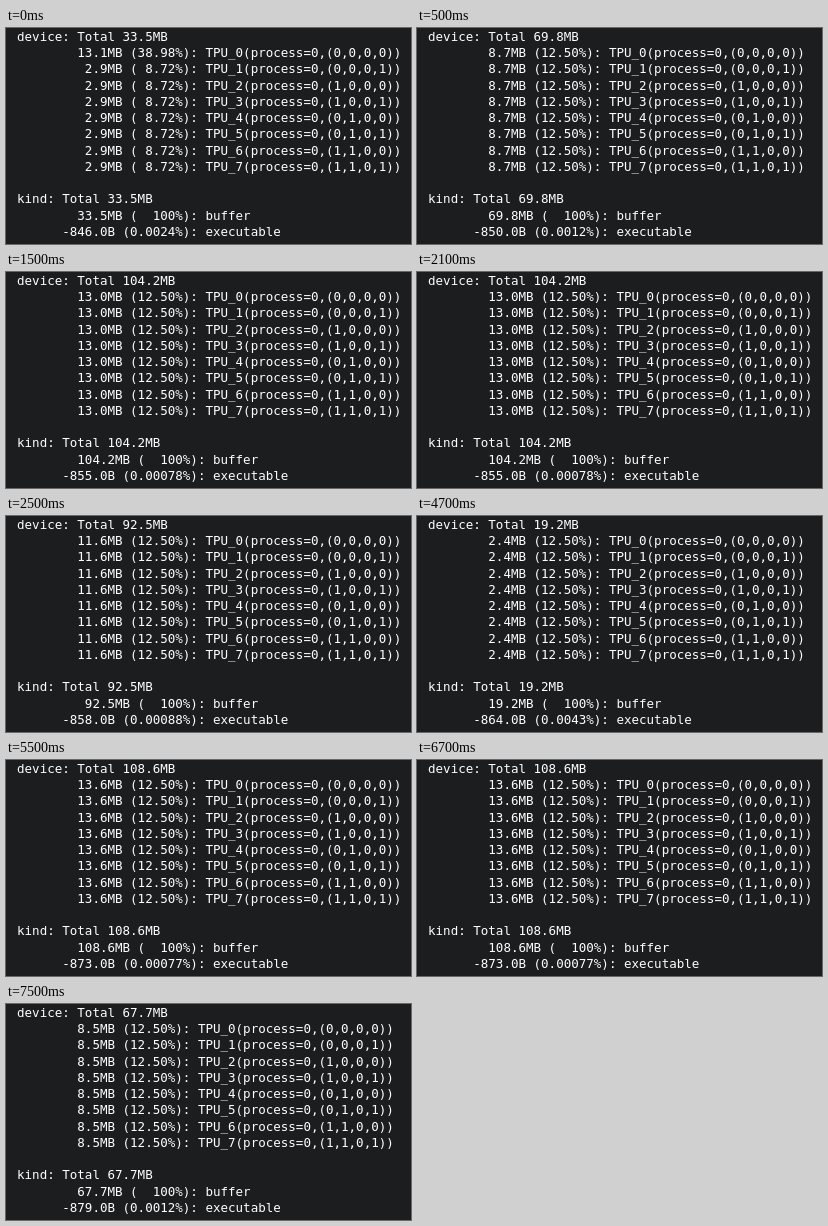
Write an HTML page that moves like this. It is 405 by 216 pixels and loops after 8 s.

```html
<!DOCTYPE html>
<html lang="en">
<head>
<meta charset="utf-8">
<title>Device memory</title>
<style>
  html, body { margin: 0; width: 100%; height: 100%; overflow: hidden; background: #1c1d1f; }
  svg { display: block; }
  text { font: 12.525px "DejaVu Sans Mono", monospace; fill: #fff; white-space: pre; }
</style>
</head>
<body>
<svg id="stage" width="405" height="216"></svg>
<script>
const LOOP = 8000, LINES = 13;

// start ms, total, memory per device, executable bytes, executable share
const reports = [
  [0, '33.5', '2.9', 846, '0.0024'],
  [500, '69.8', '8.7', 850, '0.0012'],
  [1500, '104.2', '13.0', 855, '0.00078'],
  [2500, '92.5', '11.6', 858, '0.00088'],
  [3500, '19.2', '2.4', 864, '0.0043'],
  [5500, '108.6', '13.6', 873, '0.00077'],
  [7500, '67.7', '8.5', 879, '0.0012'],
];

const rows = Array.from({ length: LINES }, (_, i) => {
  const row = document.createElementNS('http://www.w3.org/2000/svg', 'text');
  row.setAttribute('x', 11.05);
  row.setAttribute('y', Math.round(12.9 + i * 16.25));
  return stage.appendChild(row);
});

// Right-aligns the sizes; the longest one gets the given indent.
function table(entries, indent) {
  const width = indent + Math.max(...entries.map(([size]) => size.length));
  return entries.map(([size, label]) => `${size.padStart(width)}: ${label}`);
}

function reportLines([start, total, each, bytes, share]) {
  const devices = Array.from({ length: 8 }, (_, i) => {
    const even = `${each}MB (12.50%)`;
    const uneven = i ? `${each}MB ( 8.72%)` : '13.1MB (38.98%)';
    const coords = [i >> 1 & 1, i >> 2, 0, i & 1];
    return [start ? even : uneven, `TPU_${i}(process=0,(${coords}))`];
  });
  const kinds = [
    [`${total}MB (  100%)`, 'buffer'],
    [`-${bytes}.0B (${share}%)`, 'executable'],
  ];
  return [
    `device: Total ${total}MB`, ...table(devices, 8), '',
    `kind: Total ${total}MB`, ...table(kinds, 6),
  ];
}

let shown;
function draw() {
  const t = performance.now() % LOOP;
  const report = reports.findLast(([start]) => start <= t);
  if (report !== shown) {
    shown = report;
    reportLines(report).forEach((line, i) => rows[i].textContent = line);
  }
  requestAnimationFrame(draw);
}
draw();
</script>
</body>
</html>
```
